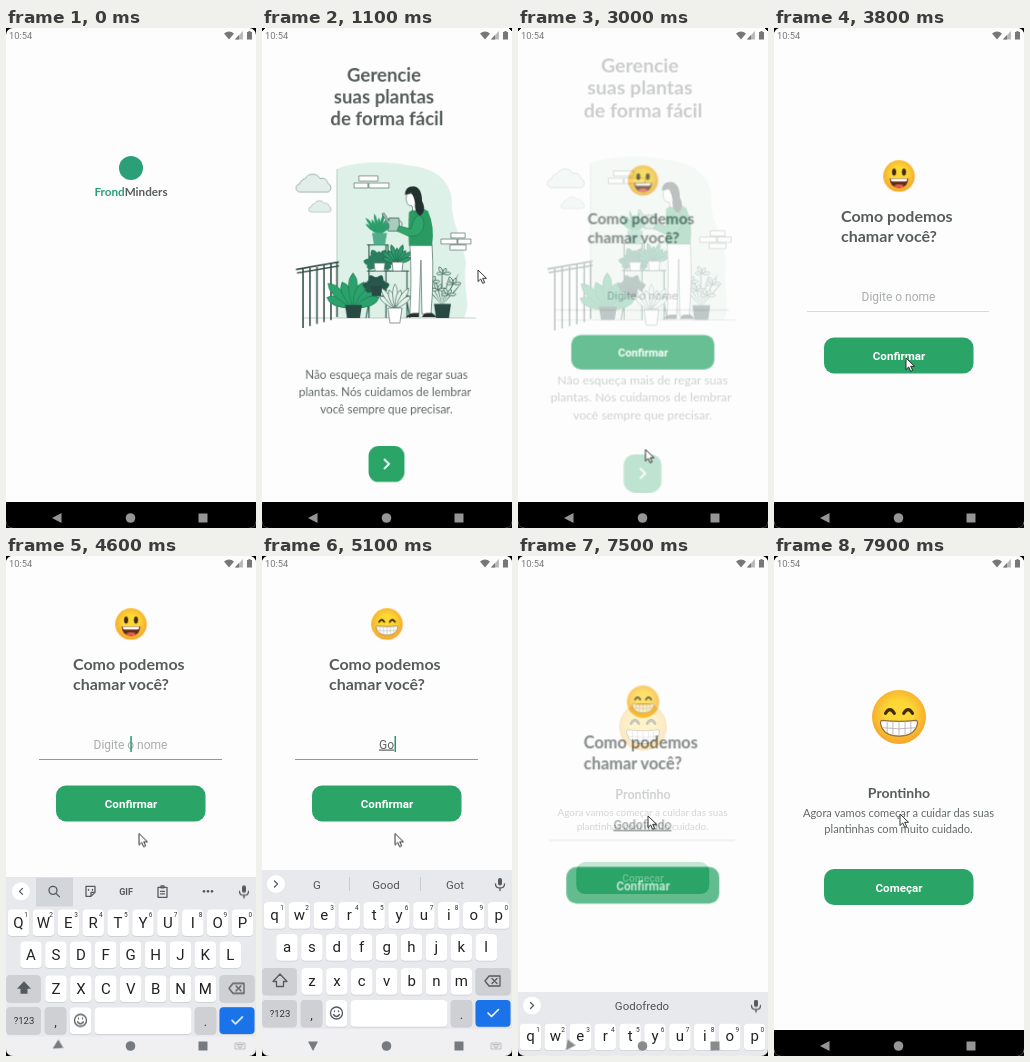
Recreate the animation shown at these times as an HTML page. Size 250x500 px, loop 8 s.

```html
<!DOCTYPE html>
<html lang="pt-BR">
<head>
<meta charset="utf-8">
<title>Plantas</title>
<style>
html, body { margin: 0; width: 100%; height: 100%; overflow: hidden; background: #000; }
svg { display: block; width: 250px; height: 500px; border-radius: 7px; background: #fdfdfd; }
text { font-family: Roboto, sans-serif; text-anchor: middle; }
.h { font-family: Lato, sans-serif; font-weight: 700; fill: #565d5b; }
.p { font-family: Lato, sans-serif; fill: #626967; }
.btn { fill: #2aa567; }
.btn-text { font-size: 11.6px; font-weight: 700; fill: #fff; }
.page { fill: #fdfdfd; }
.screen { transform-origin: 125px 250px; }
.ink { fill: none; stroke: #56706a; stroke-width: .7; }
.white { fill: #fff; }
#back { transform-origin: 51px 490px; }
#typed text { font-size: 12px; fill: #5c6361; text-decoration: underline; }
.caret { fill: #1f9a76; }
.letters text { font-size: 15px; fill: #222; }
.strip text { font-size: 11.5px; fill: #50555b; }
.icon { fill: none; stroke: #555a60; stroke-width: 1.3; stroke-linecap: round; stroke-linejoin: round; }
</style>
</head>
<body>
<svg viewBox="0 0 250 500">
  <defs>
    <radialGradient id="face" cy=".45" r=".55">
      <stop offset=".45" stop-color="#fdd835"/><stop offset="1" stop-color="#f6a52c"/>
    </radialGradient>
  </defs>

  <g id="splash">
    <circle cx="125" cy="140" r="12" fill="#2b9f77"/>
    <text class="h" x="125" y="168" font-size="11.7"><tspan fill="#2b9f77">Frond</tspan>Minders</text>
  </g>

  <g id="welcome" class="screen">
    <rect class="page" width="250" height="474"/>
    <g font-size="18.6">
      <text class="h" x="122" y="54">Gerencie</text>
      <text class="h" x="122" y="75.5">suas plantas</text>
      <text class="h" x="125" y="97.500">de forma fácil</text>
    </g>
    <g id="art">
      <path fill="#def1e8" d="M75 141C95 132 130 133 150 138C172 140 188 152 190 172C188 192 200 208 204 235C200 262 210 274 202 290H75Z"/>
      <path class="ink" d="M75 141V288M40 290H214" stroke-opacity=".45"/>
      <path id="cloud" fill="#e1eeea" stroke="#8fa39d" stroke-width=".8" d="M38 164H66A4.500 4.500 0 0 0 66 155.500A6 6 0 0 0 58 150.500A8.500 8.500 0 0 0 43 151A5.500 5.500 0 0 0 38 156A4 4 0 0 0 38 164Z"/>
      <use href="#cloud" transform="translate(25 79) scale(.64)"/>
      <path class="ink white" d="M97 148h19v5h-19zM92 155h14v5h-14zM107 155h20v5h-20zM189 205h14v5h-14zM179 211h16v5h-16zM196 211h13v5h-13zM188 217h16v5h-16z"/>
      <path fill="none" stroke="#2f4a44" stroke-width="1.500" d="M34 241.500L77 234M35 245L77 238M41 241V300M48 240V298M55 239V296M62 237V294M69 236V292M75 235V289"/>
      <path fill="none" stroke="#355f52" stroke-width="1.200" d="M105 217H126V243M107 217V290M124 217V290M105 243H147M105 268H147M145 243V290M104 290L108 268M148 290L144 268"/>
      <g id="plants"></g>
      <path fill="#4fae89" d="M110 205h15l-2 12h-11z"/>
      <path fill="#274a43" d="M83 277h17l-2 13H85zM172 276h17l-2 14h-13zM109 258h11l-1 10h-9z"/>
      <path class="ink white" d="M126 280h14l-2 15h-10zM112 235h11l-1 8h-9zM130 234h11l-1 9h-9z"/>
      <path fill="#a7cdbd" stroke="#47665d" stroke-width=".8" d="M127 190h10l1 13h-12l1-6-7-11 2-1 5 8z"/>
      <path class="ink" d="M137 192q6 3 1 9"/>
      <path class="ink white" d="M148 216H170Q172 250 169 286H160L159 232L157 286H148Q150 250 148 216Z"/>
      <path fill="#26322f" d="M144 289q4-4 8-4h5v4zM160 289q2-4 5-4h5q3 2 4 4z"/>
      <path fill="#2a9a62" d="M147 184Q157 177 166 183Q173 198 170 218H147Q146 198 147 184Z"/>
      <path fill="#2fa56b" stroke="#1c754b" stroke-width=".6" d="M157 187Q164 190 161 201Q157 210 146 208L135 203L137 198L149 201Q151 190 157 187Z"/>
      <path class="ink white" d="M145 166q-2 4 0 9 1 3 5 3l1 5 6-1-2-17z"/>
      <path fill="#24302f" d="M143 167Q143 158 152 158.500Q160 160 160 173Q165 183 158 188Q152 184 153 175Q152 168 149 165Z"/>
    </g>
    <g font-size="11.7">
      <text class="p" x="124.500" y="351">Não esqueça mais de regar suas</text>
      <text class="p" x="123" y="368">plantas. Nós cuidamos de lembrar</text>
      <text class="p" x="124.500" y="385">você sempre que precisar.</text>
    </g>
    <g id="next">
      <rect class="btn" x="106.500" y="418" width="36" height="36" rx="10"/>
      <path d="M122 431l5 5-5 5" fill="none" stroke="#fff" stroke-width="1.800"/>
    </g>
  </g>

  <g id="ask" class="screen">
    <rect class="page" width="250" height="474"/>
    <g id="form">
      <g id="happy"></g>
      <g id="grin"></g>
      <g font-size="16">
        <text class="h" style="text-anchor:start" x="67" y="193.500">Como podemos</text>
        <text class="h" style="text-anchor:start" x="67" y="214">chamar você?</text>
      </g>
      <text id="hint" x="124.500" y="272.500" font-size="12" fill="#a9adab">Digite o nome</text>
      <path d="M33 283.500H215" stroke="#d9dcdb"/>
      <path id="focus" d="M33 283.500H216" stroke="#5ab394"/>
      <rect id="caret" class="caret" x="124.300" y="260" width="1.500" height="16"/>
      <g id="typed"></g>
      <g id="confirm">
        <rect class="btn" x="50" y="309.500" width="149.500" height="36" rx="10"/>
        <text class="btn-text" x="125" y="332">Confirmar</text>
      </g>
    </g>
  </g>

  <g id="done" class="screen">
    <rect class="page" width="250" height="474"/>
    <g id="big"></g>
    <text class="h" x="125" y="242" font-size="14">Prontinho</text>
    <g font-size="11.1">
      <text class="p" x="124.500" y="261">Agora vamos começar a cuidar das suas</text>
      <text class="p" x="124.500" y="277">plantinhas com muito cuidado.</text>
    </g>
    <rect class="btn" x="50" y="313" width="149.500" height="36" rx="10"/>
    <text class="btn-text" x="125" y="335.500">Começar</text>
  </g>

  <g fill="#777">
    <text x="14.700" y="11" font-size="9.3">10:54</text>
    <path d="M218 5.500Q223 1.500 228 5.500L223 11.500Z"/>
    <path d="M237 3V11.500H229Z" fill="#b9b9b9"/><path d="M233 7V11.500H229Z"/>
    <path d="M241 4h1.500V3h2v1H246v7.500h-5z"/>
  </g>

  <rect y="474" width="250" height="26"/>
  <g id="board"></g>
  <g id="nav">
    <path id="back" d="M46 490L55.500 485V495Z"/>
    <circle cx="124.500" cy="490" r="4.800"/>
    <rect x="192.500" y="485.500" width="9" height="9"/>
    <path id="mini" d="M229 487h10v6h-10zM230.500 488.500h7M230.500 490h7M232 491.700h4" fill="none" stroke="#a9acb0" stroke-width=".7"/>
  </g>
  <g id="mouse">
    <path d="M0 0V11.500L2.700 9L4.700 13.300L6.700 12.400L4.700 8.300H8.500Z" fill="#fff" stroke="#1d1d1d" stroke-width=".9"/>
  </g>
</svg>

<script>
const LOOP = 8000;
const $ = id => document.getElementById(id);
const rules = [];

// stops: [ms, declarations]; the first and last are held to the loop ends
function anim(id, ease, stops) {
  const all = [[0, stops[0][1]], ...stops, [LOOP, stops.at(-1)[1]]];
  const frames = all.map(([t, css]) => `${t / LOOP * 100}%{${css}}`).join('');
  rules.push(`@keyframes k-${id}{${frames}} #${id}{animation:k-${id} ${LOOP}ms ${ease} infinite}`);
}
const show = (id, from, to = LOOP) =>
  anim(id, 'step-end', [[0, 'opacity:0'], [from, 'opacity:1'], ...(to < LOOP ? [[to, 'opacity:0']] : [])]);
const pose = (scale, opacity) => `transform:scale(${scale});opacity:${opacity}`;
const down = y => `transform:translateY(${y}px)`;

// Plants: leaves fanned out from one point
function plant(x, y, n, len, wide, spread, fill, line = 'none') {
  let out = '';
  for (let i = 0; i < n; i++) {
    const turn = (i / (n - 1) * 2 - 1) * spread;
    const l = len * (i % 2 ? 1 : .8);
    out += `<path transform="translate(${x} ${y}) rotate(${turn})" fill="${fill}" stroke="${line}" stroke-width=".7"
      d="M0 0Q${wide} ${-l * .75} 0 ${-l}Q${-wide} ${-l * .75} 0 0"/>`;
  }
  return out;
}
$('plants').innerHTML =
  plant(91, 280, 7, 35, 9, 68, '#2ba16c', '#1d8054') +
  plant(117, 207, 9, 22, 3, 50, '#2c9c6b') +
  plant(117, 236, 9, 16, 7, 105, '#2a7d5e') +
  plant(135, 235, 9, 19, 4, 70, '#2e9b6d', '#1e664c') +
  plant(114, 260, 9, 14, 7, 100, '#27574b') +
  plant(133, 281, 7, 25, 5, 50, '#e3f2ea', '#55786b') +
  plant(180, 277, 7, 36, 1, 42, '#4d776a') +
  [[170, 254], [176, 262], [181, 246], [191, 256], [186, 267]]
    .map(([x, y]) => plant(x, y, 4, 8, 3, 85, '#cfe3da', '#3f6a5d')).join('');

// Emoji
const happy = `<g fill="#422b0d"><ellipse cx="-5" cy="-4" rx="2.100" ry="3.600"/><ellipse cx="5" cy="-4" rx="2.100" ry="3.600"/></g>
  <path fill="#642a17" d="M-9.500 2.500H9.500Q9 12 0 12T-9.500 2.500"/>
  <path fill="#fff" d="M-8.500 2.700H8.500Q8.200 5.600 6.500 5.600H-6.500Q-8.200 5.600 -8.500 2.700"/>
  <ellipse cy="10" rx="4.500" ry="1.700" fill="#e85b4e"/>`;
const grin = `<path fill="none" stroke="#422b0d" stroke-width="1.900" stroke-linecap="round" d="M-8-2.200Q-5.400-6.500-2.800-2.200M2.800-2.200Q5.400-6.500 8-2.200"/>
  <path fill="#fff" stroke="#8f6a3c" stroke-width=".7" d="M-10 2Q0 3.200 10 2Q11.300 2.200 10.800 4.500Q9 11.300 0 11.300T-10.800 4.500Q-11.300 2.200-10 2Z"/>
  <path fill="none" stroke="#b3afa8" stroke-width=".5" d="M-10.300 6.300Q0 7.700 10.300 6.300M-7 2.300V9.500M-3.600 2.600V11M0 2.600V11.300M3.600 2.600V11M7 2.300V9.500"/>`;
const emoji = (y, r, features) =>
  `<g transform="translate(125 ${y}) scale(${r / 16})"><circle r="16" fill="url(#face)"/>${features}</g>`;
$('happy').innerHTML = emoji(148, 15.8, happy);
$('grin').innerHTML = emoji(148, 15.8, grin);
$('big').innerHTML = emoji(161, 27, grin);

// Keyboard
const label = (x, y, s, size = '') => `<text x="${x}" y="${y}"${size && ` style="font-size:${size}px"`}>${s}</text>`;
const cap = (x, y, w, fill = '#fff') =>
  `<rect x="${x - w / 2}" y="${y - 13}" width="${w}" height="27.500" rx="4" fill="#c9cbcf"/>
   <rect x="${x - w / 2}" y="${y - 13}" width="${w}" height="26.700" rx="4" fill="${fill}"/>`;
const rows = [['qwertyuiop', 12.5, 359], ['asdfghjkl', 25, 391], ['zxcvbnm', 50, 425]];
const eachKey = draw => rows.map(([keys, x, y]) =>
  [...keys].map((k, i) => draw(k, x + i * 24.9, y)).join('')).join('');
const GREY = '#cfd0d4';
const strip = (id, words) => `<g id="${id}" class="strip">
  ${words.map((w, i) => label(words.length > 1 ? 55 + i * 69 : 124, 332.5, w)).join('')}
  ${words.length > 1 ? '<path d="M87.500 321v14M158.500 321v14" stroke="#c9ccd1"/>' : ''}</g>`;

$('board').innerHTML = `
  <rect y="314" width="250" height="160" fill="#e8e9ed"/>
  <rect y="473" width="250" height="30" fill="#f0f0f2"/>
  ${eachKey((k, x, y) => cap(x, y, 21.5))}
  ${cap(17.5, 425, 34.5, GREY)}${cap(231, 425, 35, GREY)}${cap(17.5, 457, 34.5, GREY)}${cap(49.5, 457, 21.5, GREY)}
  ${cap(74.5, 457, 21.5)}${cap(137, 457, 97)}${cap(199.5, 457, 21.5, GREY)}${cap(231, 457, 35, '#1a73e8')}
  <g fill="#333">${label(18, 460.5, '?123', 9.5)}${label(49.5, 463, ',', 13)}${label(199.5, 463, '.', 13)}
  ${rows[0][0].split('').map((k, i) => label(20.2 + i * 24.9, 354, (i + 1) % 10, 6.5)).join('')}</g>
  <g id="upper" class="letters">
    ${eachKey((k, x, y) => label(x, y + 5.5, k.toUpperCase()))}
    <path d="M18 418l-7 7.500h3.500v5h7v-5H25z" fill="#555a60"/>
    <rect x="30" y="314" width="37" height="29" fill="#d2d5da"/>
    <circle cx="15" cy="328" r="9" fill="#fff"/>
    <g class="icon">
      <path d="M16.500 325l-3 3 3 3M50 330l3.500 3.500"/><circle cx="47" cy="327" r="4"/>
      <path d="M80 323h9v6l-4 4h-5zM89 329h-4v4M82.500 326v1M86.500 326v1"/>
      <path d="M152 324h9v10h-9zM155 322.500h3v2h-3zM154.500 328h4M154.500 330.500h4"/>
    </g>
    <g fill="#555a60"><circle cx="198" cy="328" r="1.300"/><circle cx="202" cy="328" r="1.300"/><circle cx="206" cy="328" r="1.300"/>
    <text x="120" y="331.500" style="font-size:9px;font-weight:700;fill:#555a60">GIF</text></g>
  </g>
  <g id="lower" class="letters">
    ${eachKey((k, x, y) => label(x, y + 4.5, k))}
    <path class="icon" d="M18 418l-7 7.500h3.500v5h7v-5H25z"/>
    <circle cx="14" cy="328" r="9" fill="#fff"/><path class="icon" d="M12.500 325l3 3-3 3"/>
  </g>
  ${strip('s1', ['G', 'Good', 'Got'])}${strip('s2', ['Go', 'Gol', 'Gosto'])}${strip('s3', ['Godofredo'])}
  <rect x="236" y="322" width="4" height="7.500" rx="2" fill="#555a60"/>
  <g class="icon">
    <path d="M233.500 328q0 4 4.500 4t4.500-4M238 332v2.500"/>
    <path d="M223 425l4-5h11v10h-11zM230 422.500l5 5M235 422.500l-5 5"/>
    <circle cx="74.500" cy="457" r="6"/><path d="M72.500 455v.5M76.500 455v.5M71.500 458.500q3 4 6 0"/>
    <path d="M226 457l3.500 3.500 7-7" style="stroke:#fff;stroke-width:1.600"/>
  </g>`;

// Typed name with the caret after it
const NAME = 'Godofredo';
const times = [4800, 5000, 5300, 5400, 5500, 5600, 5700, 5800, 5900, LOOP];
const typed = $('typed');
typed.innerHTML = [...NAME].map((c, i) =>
  `<g id="t${i}"><text x="124.500" y="272.500">${NAME.slice(0, i + 1)}</text>
   <rect class="caret" y="260" width="1.500" height="16"/></g>`).join('');
[...typed.children].forEach((g, i) => {
  const [word, bar] = g.children;
  bar.setAttribute('x', 125 + word.getComputedTextLength() / 2);
  show(g.id, times[i], times[i + 1]);
  if (i === NAME.length - 1) bar.id = 'blink';
});
anim('blink', 'step-end', [[0, 'opacity:1'], [6400, 'opacity:0'], [6900, 'opacity:1'], [7400, 'opacity:0']]);

// Screens
show('splash', 0, 900);
anim('welcome', 'linear', [[599.9, pose(1, 0)], [600, pose(1, .35)], [800, pose(1, 1)], [2800, pose(1, 1)], [3200, pose(1.1, 1)]]);
anim('next', 'linear', [[2690, 'opacity:1'], [2720, 'opacity:.7'], [2850, 'opacity:1']]);
anim('ask', 'ease-out', [[2780, pose(.85, 0)], [3200, pose(1, 1)], [7450, pose(1, 1)], [7800, pose(1.1, 1)]]);
anim('form', 'step-end', [[0, down(0)], [4500, down(-80)], [7500, down(0)]]);
anim('confirm', 'linear', [[7190, 'opacity:1'], [7200, 'opacity:.72'], [7400, 'opacity:.72'], [7480, 'opacity:1']]);
anim('done', 'ease-out', [[7430, pose(.85, 0)], [7850, pose(1, 1)]]);

// Input and keyboard
show('happy', 0, 4800);
show('grin', 4800);
show('hint', 0, 4800);
show('caret', 4450, 4800);
show('focus', 4400, 7450);
show('upper', 4400, 4850);
show('lower', 4850);
show('s1', 4850, 5300);
show('s2', 5300, 6000);
show('s3', 6000);
anim('board', 'ease-out', [[4400, down(190)], [4500, down(60)], [4600, down(7.5)], [4700, down(0)], [7400, down(0)], [7620, down(190)]]);
const turn = a => `transform:rotate(${a}deg)`;
anim('back', 'linear', [[4540, turn(0)], [4720, turn(-90)], [7420, turn(-90)], [7620, turn(0)]]);
anim('nav', 'linear', [[4420, 'fill:#959595'], [4520, 'fill:#777a7e'], [7420, 'fill:#777a7e'], [7560, 'fill:#959595']]);
show('mini', 4500, 7500);

// Pointer
const at = (x, y, o = 1) => `transform:translate(${x}px,${y}px);opacity:${o}`;
anim('mouse', 'ease-in-out', [
  [1099.9, at(216, 242, 0)], [1100, at(216, 242)], [1400, at(203, 459)], [1800, at(203, 459)],
  [2350, at(127.5, 421.5)], [3200, at(127.5, 421.5)], [3550, at(132, 330)], [3800, at(132, 330)],
  [4100, at(133, 277.5)], [6400, at(133, 277.5)], [7000, at(130, 260)], [7500, at(130, 260)], [7850, at(126, 258)]
]);

const sheet = document.createElement('style');
sheet.textContent = rules.join('\n');
document.head.append(sheet);
</script>
</body>
</html>
```
